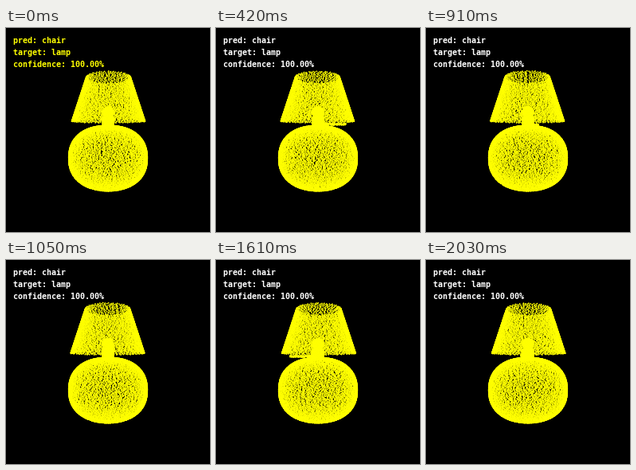
Write a matplotlib script that moves like this. It is 256 px wide and 256 px high and loops after 2100 ms.

```python
import numpy as np
import matplotlib.pyplot as plt
from matplotlib.animation import FuncAnimation

SIZE, DPI = 256, 100
FRAMES, INTERVAL = 30, 70
CENTER, DIST = 128, 240          # optical centre and camera distance in px
DOT = 0.85                       # dot radius in px
YELLOW = (1, 1, 0)
rng = np.random.default_rng(4)


def revolve(r, y, count):
    """Spread points evenly over the surface swept by the profile (r, y)."""
    ring = np.hypot(np.diff(r), np.diff(y)) * (r[1:] + r[:-1]) / 2
    area = np.concatenate([[0], np.cumsum(ring)])
    k = np.arange(count)
    u = (k + rng.normal(0, 6, count)) / count * area[-1]
    a = 2 * np.pi * (k * 0.618034 + rng.normal(0, 0.003, count))
    rad, h = np.interp(u, area, r), np.interp(u, area, y)
    return np.array([rad * np.sin(a), h, rad * np.cos(a)])


def power(v, p):
    return np.sign(v) * np.abs(v) ** p


def lamp():
    shade = revolve(np.linspace(27.6, 45.4, 60), np.linspace(62.3, 117.6, 60),
                    3700)
    tilt = np.radians(150)
    shade += np.array([[np.sin(tilt)], [0], [np.cos(tilt)]])

    t = np.linspace(-np.pi / 2, np.pi / 2, 300)
    s = power(np.sin(t), 2 / 2.3)
    base = revolve(48.3 * np.abs(np.cos(t)) ** (2 / 2.3),
                   162 + np.where(s < 0, 39.5, 38.5) * s, 6500)

    bulb = revolve(6.8 * np.cos(t), 106 + 7 * np.sin(t), 400)
    neck = revolve(np.full(20, 6.8), np.linspace(112, 124, 20), 400)

    n = 200
    rod = np.array([rng.uniform(-1, 1, n), 121 + rng.uniform(-1, 1, n),
                    rng.uniform(0, 35, n)])
    return np.hstack([shade, base, bulb, neck, rod])


POINTS = lamp()


def render(angle):
    """Project the turned cloud and lay down soft-edged dots."""
    x, y, z = POINTS
    c, s = np.cos(angle), np.sin(angle)
    scale = DIST / (DIST - (z * c - x * s))
    px = CENTER + (x * c + z * s) * scale
    py = CENTER + (y - CENTER) * scale
    ix, iy = px.astype(int), py.astype(int)
    dark = np.ones((SIZE, SIZE))
    for dx in (-1, 0, 1):
        for dy in (-1, 0, 1):
            gap = np.hypot(ix + dx + 0.5 - px, iy + dy + 0.5 - py)
            cover = np.clip(DOT + 0.5 - gap, 0, 1)
            np.multiply.at(dark, (iy + dy, ix + dx), 1 - cover)
    return (1 - dark)[..., None] * YELLOW


fig = plt.figure(figsize=(SIZE / DPI, SIZE / DPI), dpi=DPI, facecolor="black")
ax = fig.add_axes([0, 0, 1, 1])
ax.axis("off")
picture = ax.imshow(render(0), extent=(0, SIZE, SIZE, 0),
                    interpolation="nearest")

lines = ("pred: chair", "target: lamp", "confidence: 100.00%")
labels = [ax.text(9, 19 + 15 * i, line, family="DejaVu Sans Mono",
                  weight="bold", size=10 * 72 / DPI, va="baseline")
          for i, line in enumerate(lines)]


def update(i):
    picture.set_data(render(2 * np.pi * i / FRAMES))
    for label in labels:
        label.set_color(YELLOW if i == 0 else "white")
    return [picture, *labels]


anim = FuncAnimation(fig, update, frames=FRAMES, interval=INTERVAL,
                     repeat=True, repeat_delay=0)
plt.show()
```
